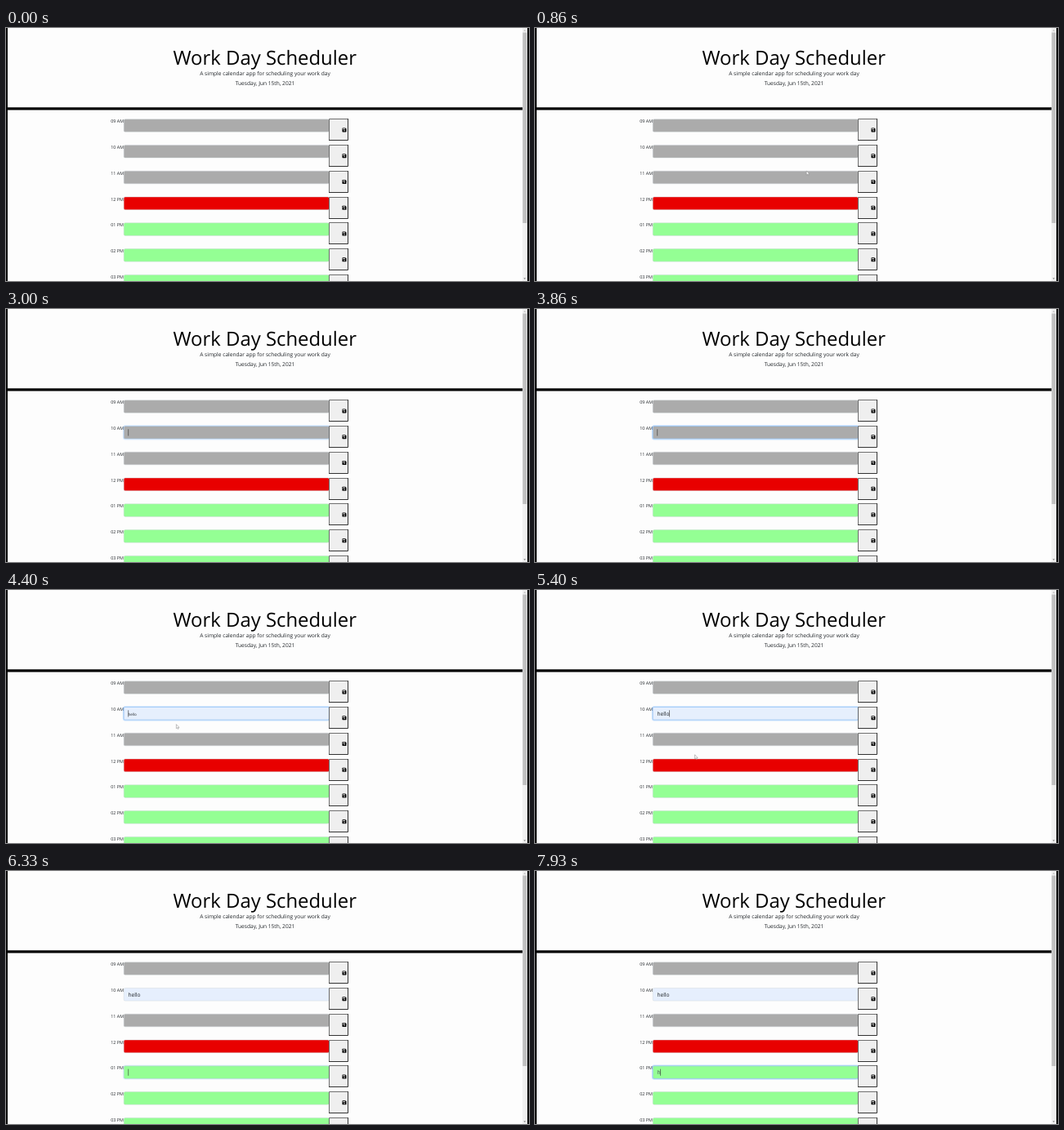
An HTML page for the animation above (8000 ms loop, 640 px wide and 310 px high).

```html
<!DOCTYPE html>
<html lang="en">
<head>
<meta charset="utf-8">
<title>Work Day Scheduler</title>
<style>
  html, body { margin: 0; width: 100%; height: 100%; overflow: hidden; background: #fdfdfd; }
  svg { display: block; width: 640px; height: 310px; }
  text { font: 6.64px "Open Sans", sans-serif; fill: #212529; text-rendering: geometricPrecision; white-space: pre; }
  .title { font-size: 23.9px; fill: #000; }
  .label { font-size: 5.4px; }
</style>
</head>
<body>
<svg id="stage" viewBox="0 0 640 310">
  <rect width="640" height="310" fill="#fdfdfd"/>
  <text class="title" x="316.7" y="44.6" text-anchor="middle">Work Day Scheduler</text>
  <text x="317" y="57.8" text-anchor="middle">A simple calendar app for scheduling your work day</text>
  <text x="317" y="69.7" text-anchor="middle">Tuesday, Jun 15th, 2021</text>
  <path d="M0 0H2V310H0ZM638 0H640V310H638ZM0 97.2H632V100.5H0Z"/>
  <rect x="632" width="6" height="310" fill="#f1f1f1"/>
  <rect x="632.3" y="5.5" width="5" height="233.5" fill="#c1c1c1"/>
  <path d="M633.4 3.6L634.7 2.2L636 3.6Z" fill="#a3a3a3"/>
  <path d="M633.4 306.4L634.7 307.8L636 306.4Z" fill="#505050"/>
  <g id="rows"></g>
  <text id="entry" x="149.4"></text>
  <text id="typed" x="149.4" y="248.9" style="fill:#495057"></text>
  <rect id="caret" width=".6" height="8.2" fill="#333"/>
  <path id="pointer" d="M0 0V5.1L1.2 4.1L2 5.8L2.8 5.4L2.1 3.8H3.6Z" fill="#fff" stroke="#808080" stroke-width=".5"/>
</svg>
<script>
const LOOP = 8000, BLINK = 530;
const FIELD = { x: 144.2, w: 251.2, h: 15.6 };
const FOCUS_10 = 2800, PREVIEW = 4390, FILL = 5060, FOCUS_13 = 6130, TYPE_H = 7860;
const rowY = i => 111.7 + 31.78 * i;
const $ = id => document.getElementById(id);

const labels = ['09 AM', '10 AM', '11 AM', '12 PM', '01 PM', '02 PM', '03 PM'];
const fieldColor = i => i < 3 ? '#ababab' : i === 3 ? '#e80000' : '#94ff94';

// A field-shaped rectangle, grown by the given amount on every side.
const fieldRect = (y, grow, attrs) =>
  `<rect x="${FIELD.x - grow}" y="${y - grow}" width="${FIELD.w + 2 * grow}" height="${FIELD.h + 2 * grow}"
    rx="${1.6 + grow}" ${attrs}/>`;

$('rows').innerHTML = labels.map((label, i) => {
  const y = rowY(i), top = Math.floor(y) + .5;
  return `<text class="label" x="128.2" y="${y + 4.5}">${label}</text>
    ${fieldRect(y, 0, `id="field${i}" fill="${fieldColor(i)}" stroke="#ced4da" stroke-width=".45"`)}
    <g id="ring${i}" fill="none" opacity="0">
      ${fieldRect(y, .7, 'stroke="#007bff" stroke-opacity=".2" stroke-width="1.2"')}
      ${fieldRect(y, 0, 'stroke="#80bdff" stroke-width=".5"')}
    </g>
    <rect x="395.5" y="${top}" width="23" height="26" fill="#efefef"/>
    <path d="M395.5 ${top + 26}V${top}H418.5" fill="none" stroke="#4c4c4c" stroke-width=".8"/>
    <path d="M395.1 ${top + 26}H418.5V${top - .4}" fill="none" stroke="#111" stroke-width=".85"/>
    <g transform="translate(411.5 ${y + 10.7})">
      <path d="M.6 0H3.8L5 1.2V4.4Q5 5 4.4 5H.6Q0 5 0 4.4V.6Q0 0 .6 0Z"/>
      <path d="M.8 .8H3.4V1.9H.8Z" fill="#efefef"/><circle cx="2.5" cy="3.4" r=".75" fill="#efefef"/>
    </g>`;
}).join('');

// Pointer trips: time, x, y. It only shows outside the input fields.
const trips = [
  [[400, 523, 205], [560, 455, 192], [760, 360, 178], [960, 305, 172], [1130, 291, 170],
   [1870, 291, 170], [1930, 289.8, 169], [2000, 280, 163], [2130, 262, 152]],
  [[4130, 216, 152], [4260, 211, 161], [4400, 208.4, 164.6], [4460, 207.5, 166],
   [5270, 207.5, 166], [5330, 203, 180], [5400, 195.6, 201.6], [5530, 190, 225], [5800, 186, 246]]
];

function pointerAt(t) {
  const trip = trips.find(p => t >= p[0][0] && t < p[p.length - 1][0]);
  if (!trip) return null;
  const k = trip.findIndex(p => p[0] > t), a = trip[k - 1], b = trip[k];
  const u = (t - a[0]) / (b[0] - a[0]);
  const x = a[1] + (b[1] - a[1]) * u, y = a[2] + (b[2] - a[2]) * u;
  const overField = x > FIELD.x && x < FIELD.x + FIELD.w &&
    labels.some((_, i) => y > rowY(i) && y < rowY(i) + FIELD.h);
  return overField ? null : [x, y];
}

const clamp = v => Math.max(0, Math.min(1, v));

function draw(t) {
  const filled = t >= FILL, preview = t >= PREVIEW && !filled, onSecond = t >= FOCUS_13;

  $('field1').setAttribute('fill', t >= PREVIEW ? '#e6effd' : fieldColor(1));
  $('ring1').setAttribute('opacity', onSecond ? clamp(1 - (t - FOCUS_13) / 150) : clamp((t - FOCUS_10) / 330));
  $('ring4').setAttribute('opacity', clamp((t - FOCUS_13) / 330) ** 2);

  const entry = $('entry');
  entry.textContent = t >= PREVIEW ? 'hello' : '';
  entry.style.fontSize = preview ? '4.5px' : '6.64px';
  entry.setAttribute('y', 153.7);
  $('typed').textContent = t >= TYPE_H ? 'h' : '';

  // Every caret move restarts its blinking.
  const since = [TYPE_H, FOCUS_13, FILL, PREVIEW, FOCUS_10].find(s => t >= s);
  const blinkOn = since !== undefined && Math.floor((t - since) / BLINK) % 2 === 0;
  const caret = $('caret');
  caret.setAttribute('x', t >= TYPE_H ? 153.4 : filled && !onSecond ? 164.4 : 149.5);
  caret.setAttribute('y', rowY(onSecond ? 4 : 1) + 3.8);
  caret.setAttribute('visibility', blinkOn ? 'visible' : 'hidden');

  const at = pointerAt(t), pointer = $('pointer');
  pointer.setAttribute('visibility', at ? 'visible' : 'hidden');
  if (at) pointer.setAttribute('transform', `translate(${at})`);
}

function tick() {
  draw(performance.now() % LOOP);
  requestAnimationFrame(tick);
}
tick();
</script>
</body>
</html>
```
